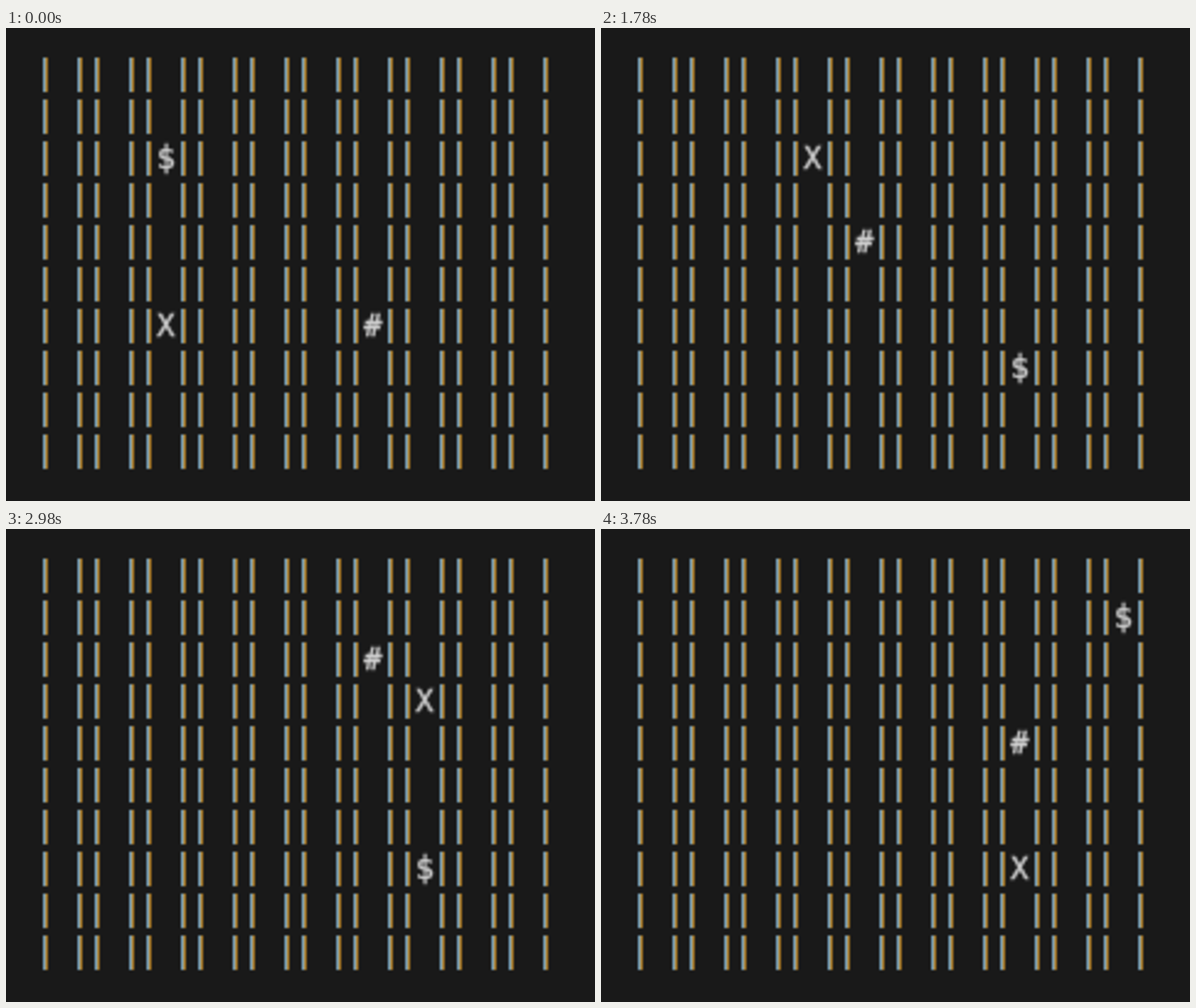
An HTML page with a canvas for the animation above (4250 ms loop, 800x643 px).

```html
<!DOCTYPE html>
<html lang="en">
<head>
<meta charset="utf-8">
<title>Grid chase</title>
<style>
  html, body { margin: 0; width: 100%; height: 100%; overflow: hidden; background: #191919; }
  canvas { display: block; width: 100vw; height: 100vh; }
</style>
</head>
<body>
<canvas id="stage" width="800" height="643"></canvas>
<script>
const stage = document.getElementById('stage').getContext('2d');
// A small terminal screen, enlarged smoothly onto the stage
const terminal = document.createElement('canvas');
terminal.width = 239;
terminal.height = 192;
const ctx = terminal.getContext('2d');

const LOOP = 4250, SIZE = 10, CELL_W = 21, CELL_H = 17, LEFT = 15, TOP = 12;
const BACK = '#191919';

// Key presses of the player; on a capital letter the hunter steps too.
const KEYS = 'uuUuRrRrRdddDD';
const PRESS_TIMES = [200, 530, 790, 1050, 1780, 2050, 2450, 2580, 2780, 2980, 3180, 3320, 3580, 3780];
const STEPS = { u: { x: 0, y: -1 }, d: { x: 0, y: 1 }, r: { x: 1, y: 0 } };

function stateAt(time) {
  const player = { x: 2, y: 6 }, hunter = { x: 6, y: 6 };
  const prizes = [{ x: 2, y: 2 }, { x: 7, y: 7 }, { x: 9, y: 1 }];
  PRESS_TIMES.filter(press => press <= time).forEach((_, i) => {
    const key = KEYS[i], step = STEPS[key.toLowerCase()];
    player.x += step.x;
    player.y += step.y;
    if (key !== key.toLowerCase()) {
      hunter.x += Math.sign(player.x - hunter.x);
      hunter.y += Math.sign(player.y - hunter.y);
    }
    if (player.x === prizes[0].x && player.y === prizes[0].y) prizes.shift();
  });
  return { player, hunter, prize: prizes[0] };
}

function drawBar(x, y) {
  ctx.fillStyle = '#7ba6c0';
  ctx.fillRect(x, y, 1, 14);
  ctx.fillStyle = '#b07e28';
  ctx.fillRect(x + 1, y, 1, 14);
}

function drawGrid() {
  for (let row = 0; row < SIZE; row++) {
    for (let col = 0; col < SIZE; col++) {
      const x = LEFT + col * CELL_W, y = TOP + row * CELL_H;
      drawBar(x, y);
      drawBar(x + 14, y);
    }
  }
}

function drawGlyph(glyph, cell, size = 12) {
  const x = LEFT + 7.85 + cell.x * CELL_W, y = TOP + 11 + cell.y * CELL_H;
  ctx.font = `${size}px "DejaVu Sans Mono", monospace`;
  ctx.fillText(glyph, x, y);
  ctx.strokeText(glyph, x, y);
}

function render(now) {
  const { player, hunter, prize } = stateAt(Math.max(0, now - start) % LOOP);
  ctx.fillStyle = BACK;
  ctx.fillRect(0, 0, terminal.width, terminal.height);
  drawGrid();
  ctx.fillStyle = ctx.strokeStyle = '#d4d4d4';
  ctx.lineWidth = 0.35;
  ctx.textAlign = 'center';
  drawGlyph('$', prize, 13);
  drawGlyph('#', hunter);
  drawGlyph('X', player);
  stage.imageSmoothingQuality = 'high';
  stage.drawImage(terminal, 0, 0, 800, 643);
  requestAnimationFrame(render);
}

const start = performance.now();
render(start);
</script>
</body>
</html>
```
